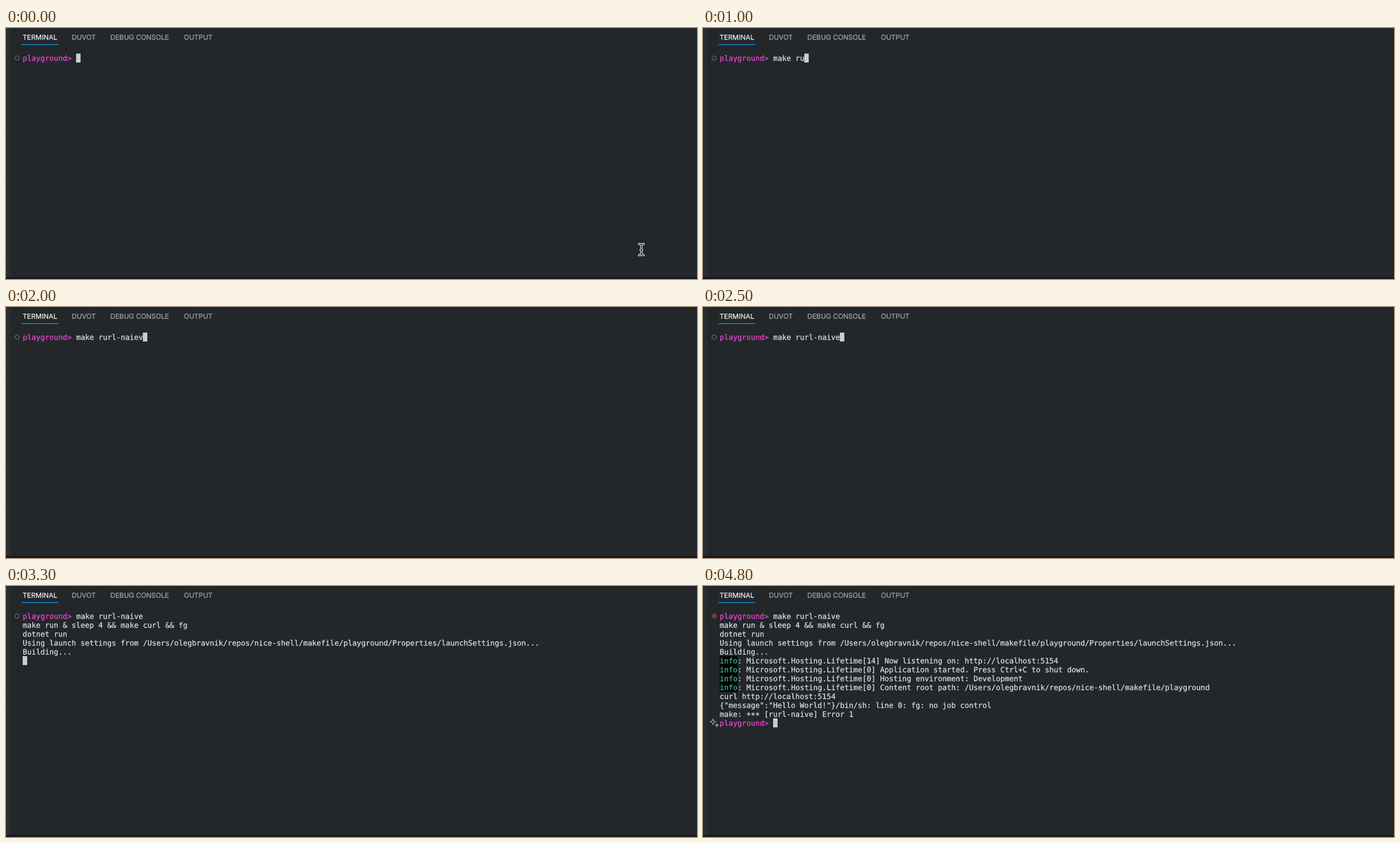
An HTML page that plays this animation: 1242 px wide and 451 px high, repeating every 6.52 s.

```html
<!DOCTYPE html>
<html lang="en">
<head>
<meta charset="utf-8">
<title>Terminal session</title>
<style>
html, body { margin: 0; width: 100%; height: 100%; overflow: hidden; background: #23272a; }
svg { display: block; width: 100vw; height: 100vh; }
text { white-space: pre; text-rendering: geometricPrecision; stroke-width: .25; }
.tab { font: 12.3px Inter, sans-serif; fill: #a2a4a6; stroke: #a2a4a6; }
.tab.on { fill: #eeeeef; stroke: #eeeeef; }
#term text { font: 13.315px "DejaVu Sans Mono", monospace; fill: #dfe0e0; stroke: #dfe0e0; }
#term .prompt { fill: #f046d3; stroke: #f046d3; }
#term .info { fill: #3fbd90; stroke: #3fbd90; }
</style>
</head>
<body>
<svg viewBox="0 0 1242 451" preserveAspectRatio="none">
  <defs>
    <linearGradient id="edge">
      <stop offset="0" stop-color="#2d2e31"/>
      <stop offset=".75" stop-color="#292c2e"/>
      <stop offset="1" stop-color="#23272a"/>
    </linearGradient>
    <path id="beam" d="M1138 388.2q4 0 4 4v12q0 4-4 4M1146 388.2q-4 0-4 4M1142 404.2q0 4 4 4M1140.6 399h2.8"/>
  </defs>
  <rect width="1242" height="451" fill="#23272a"/>
  <rect width="10" height="448" fill="url(#edge)"/>
  <rect y="447.5" width="1242" height="3.5" fill="#1b1819"/>

  <text class="tab on" x="29.8" y="21.4">TERMINAL</text>
  <text class="tab" x="118.3" y="21.4">DUVOT</text>
  <text class="tab" x="187.6" y="21.4">DEBUG CONSOLE</text>
  <text class="tab" x="319.8" y="21.4">OUTPUT</text>
  <rect x="28" y="29" width="66" height="1.5" fill="#0f8cd8"/>

  <g id="term"></g>
  <rect id="caret" width="8" height="16" fill="#cbcccc"/>

  <circle id="idle" cx="20" cy="54" r="3.8" fill="none" stroke="#7b7e80" stroke-width="1.1"/>
  <g id="failed" fill="none" stroke="#d9495f" stroke-width="1.1">
    <circle cx="20" cy="54" r="3.8"/>
    <path d="M18.3 52.3l3.4 3.4m0-3.4l-3.4 3.4"/>
  </g>
  <path id="spark" fill="none" stroke="#8fb6dc" stroke-width="1.1" stroke-linejoin="round"
    d="M18 238.6Q18.6 243.4 23.2 244Q18.6 244.6 18 249.4Q17.4 244.6 12.8 244Q17.4 243.4 18 238.6Z
       M25 247.4Q25.3 249.9 27.8 250.2Q25.3 250.5 25 253Q24.7 250.5 22.2 250.2Q24.7 249.9 25 247.4Z"/>

  <g id="pointer" fill="none" stroke-linecap="round">
    <use href="#beam" stroke="#f4f4f4" stroke-width="3.8"/>
    <use href="#beam" stroke="#17191b" stroke-width="1.5"/>
  </g>
</svg>
<script>
const LOOP = 6520, CELL = 8.016, ROW = 16, LEFT = 30, TOP = 46;
const $ = id => document.getElementById(id);
const NS = "http://www.w3.org/2000/svg";
const term = $("term");
const PROMPT = "playground> ";
const ROOT = "/Users/olegbravnik/repos/nice-shell/makefile/playground";
const HOST = ": Microsoft.Hosting.Lifetime";

// [time, text typed after the prompt]
const COMMAND = "make rurl-naive";
const typed = [[0, ""]];
const type = (start, ...counts) =>
  counts.forEach((n, i) => typed.push([start + i * 100, COMMAND.slice(0, n)]));
type(500, 1, 2, 3, 5, 6, 7, 8);
type(1300, 9, 10, 11, 12);
type(1800, 13);
typed.push([1900, "make rurl-naie"], [2000, "make rurl-naiev"]);
type(2300, 13, 14, 15);

// [time, text, kind], one per row below the command
const output = [
  [2800, "make run & sleep 4 && make curl && fg"],
  [2800, "dotnet run"],
  [2900, `Using launch settings from ${ROOT}/Properties/launchSettings.json...`],
  [2900, "Building..."],
  [3500, HOST + "[14] Now listening on: http://localhost:5154", "info"],
  [3500, HOST + "[0] Application started. Press Ctrl+C to shut down.", "info"],
  [3500, HOST + "[0] Hosting environment: Development", "info"],
  [3500, HOST + `[0] Content root path: ${ROOT}`, "info"],
  [4800, "curl http://localhost:5154"],
  [4800, '{"message":"Hello World!"}/bin/sh: line 0: fg: no job control'],
  [4800, "make: *** [rurl-naive] Error 1"],
  [4800, PROMPT, "prompt"]
];

function add(parent, tag, attrs, content = "") {
  const el = document.createElementNS(NS, tag);
  for (const key in attrs) el.setAttribute(key, attrs[key]);
  el.textContent = content;
  return parent.appendChild(el);
}

function write(parent, row, col, content, kind = "") {
  return add(parent, "text", { x: LEFT + col * CELL, y: TOP + row * ROW + 12.6, class: kind }, content);
}

write(term, 0, 0, PROMPT, "prompt");
const command = write(term, 0, PROMPT.length, "");

const rows = output.map(([time, content, kind], i) => {
  const row = i + 1, el = add(term, "g", {});
  if (kind === "info") {
    add(el, "rect", { x: LEFT, y: TOP + row * ROW, width: 4 * CELL, height: ROW, fill: "#000" });
    write(el, row, 0, "info", "info");
    write(el, row, 4, content);
  } else if (content.includes("***")) {
    // asterisks sit at mid height
    const [before, after] = content.split("***");
    const line = write(el, row, 0, before);
    add(line, "tspan", { dy: 2.2 }, "***");
    add(line, "tspan", { dy: -2.2 }, after);
  } else {
    write(el, row, 0, content, kind);
  }
  return { time, el };
});

const show = (el, on) => { el.style.display = on ? "" : "none"; };

function draw(t) {
  const text = typed.filter(step => step[0] <= t).pop()[1];
  if (command.textContent !== text) command.textContent = text;

  let count = 0;
  for (const { time, el } of rows) {
    show(el, t >= time);
    if (t >= time) count++;
  }
  const done = count === rows.length;
  const row = done ? count : count && count + 1;
  const col = done ? PROMPT.length : count ? 0 : PROMPT.length + text.length;
  $("caret").setAttribute("x", Math.round(LEFT + col * CELL));
  $("caret").setAttribute("y", TOP + row * ROW);

  show($("pointer"), t < 500);
  show($("idle"), !done);
  show($("failed"), done);
  show($("spark"), done);
}

const start = performance.now();
function tick() {
  draw((performance.now() - start) % LOOP);
  requestAnimationFrame(tick);
}
tick();
</script>
</body>
</html>
```
